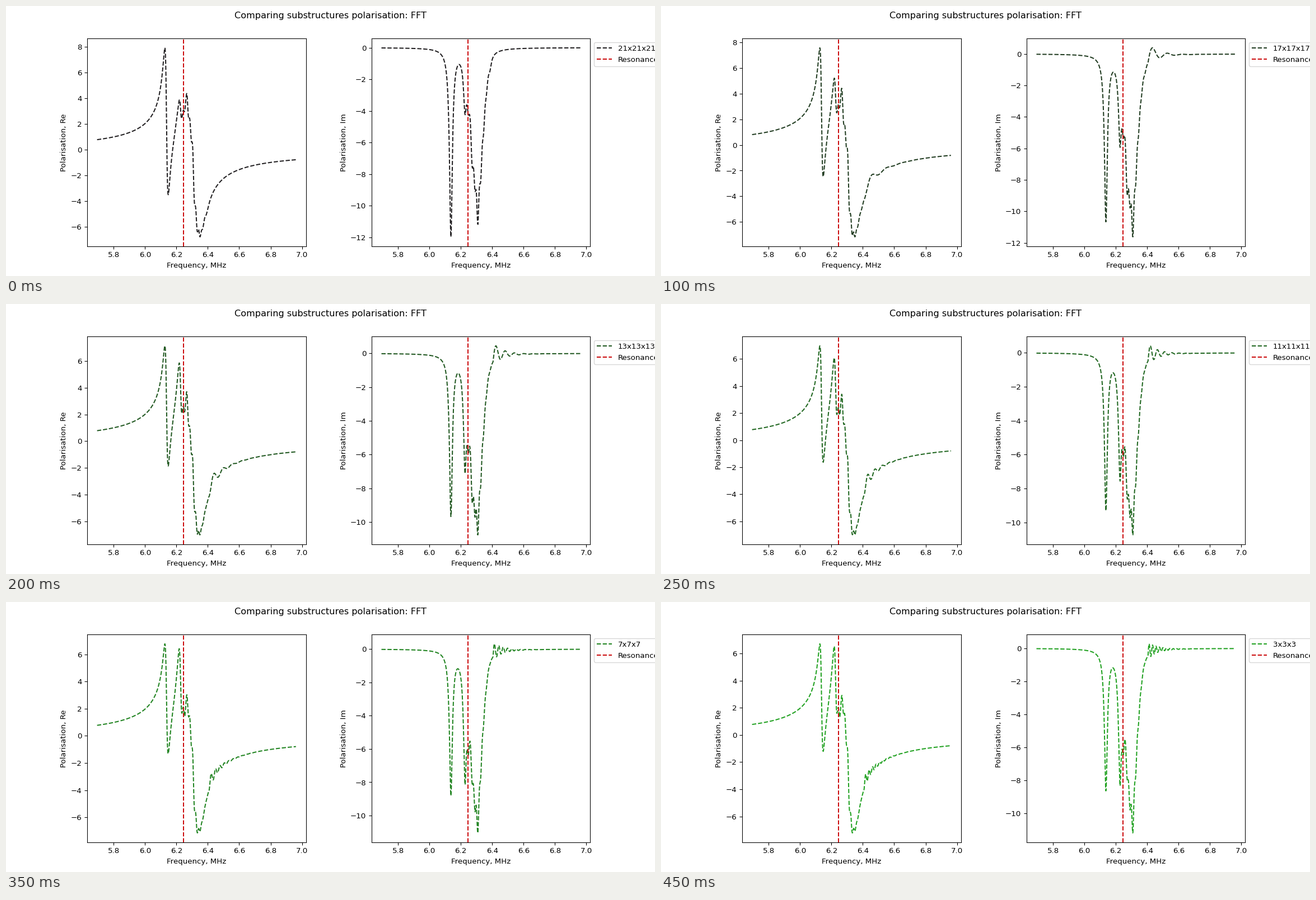
Write a matplotlib script that moves like this. It is 1159 px wide and 483 px high and loops after 500 ms.

```python
import numpy as np
import matplotlib.pyplot as plt
from matplotlib.animation import FuncAnimation

SIZES = range(21, 1, -2)
F = np.linspace(5.6945, 6.9615, 700)
RESONANCE = 6.245
DAMPING = .011
OFFSET = -.1
RIPPLE_START = 6.405

# Mode frequencies and their strengths in the largest and smallest lattice
MODES = np.array([6.137, 6.2265, 6.248, 6.272, 6.29,
                  6.3085, 6.327, 6.345, 6.363, 6.385])
LARGE = np.array([11.8, 3.0, 2.0, 4.65, 4.95, 7.8, 4.85, 2.75, 1.2, .6])
SMALL = np.array([8.4, 6.85, 3.45, 4.5, 5.6, 7.8, 4.25, 2.1, .8, .1])


def ripple(u):
    """Decaying wave above the band; its period shrinks with the lattice."""
    t = np.clip(F - RIPPLE_START, 0, None)
    period = .142 - .12 * u
    level = (.5 + .25 * np.sin(np.pi * u)) * (u > 0)
    start = -np.pi / 6
    wave = np.exp(1j * (2 * np.pi * t / period + start)) - np.exp(1j * start)
    return -level * np.exp(-t / .06) * wave.conj()


def polarisation(u):
    """Sum of damped modes, u runs from the largest (0) to the smallest (1)."""
    strength = LARGE + (SMALL - LARGE) * u
    strength[3] += 1.3 * np.sin(np.pi * u)
    strength[5] += .55 * np.sin(2 * np.pi * u)
    response = DAMPING / (MODES[:, None] - F + 1j * DAMPING)
    return strength @ response + OFFSET * (F > 0) + ripple(u)


# A 12 x 5 inch figure, 1159 x 483 pixels
fig, axes = plt.subplots(1, 2, figsize=(12, 5), dpi=96.61)
fig.subplots_adjust(left=.125, right=.9, bottom=.11, top=.88, wspace=.3)
fig.suptitle("Comparing substructures polarisation: FFT")


def draw(i):
    n = SIZES[i]
    s = i / (len(SIZES) - 1)
    p = polarisation(1 - (1 - s) ** 2)
    color = (.13, .12 + .51 * s, .13)
    for ax, y, name in zip(axes, (p.real, p.imag), ("Re", "Im")):
        ax.clear()
        ax.plot(F, y, "--", color=color, label=f"{n}x{n}x{n}")
        ax.axvline(RESONANCE, ls="--", color=(.8, .05, .06), label="Resonance")
        ax.set_xlabel("Frequency, MHz")
        ax.set_ylabel(f"Polarisation, {name}")
    axes[1].legend(loc="upper left", bbox_to_anchor=(1, 1))


anim = FuncAnimation(fig, draw, frames=len(SIZES), interval=50,
                     init_func=lambda: None, repeat=True, repeat_delay=0)
plt.show()
```
